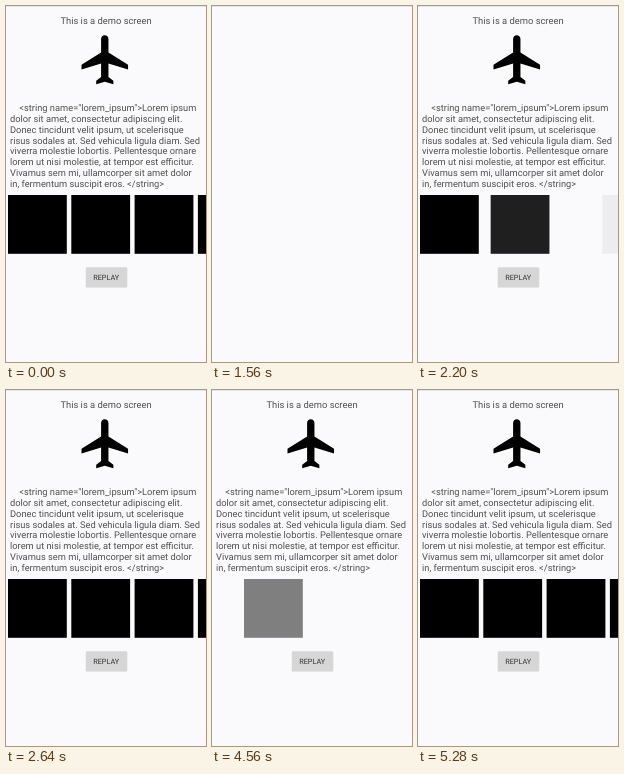
Animation of 200 by 356 pixels, one loop 5440 ms. Source, as an HTML page:

```html
<!DOCTYPE html>
<html lang="en">
<head>
<meta charset="utf-8">
<title>Demo screen</title>
<style>
  html, body { margin: 0; width: 100%; height: 100%; overflow: hidden; background: #faf9fb; }
  svg { display: block; width: 100%; height: 100%; }
  text { font-family: Roboto, "Liberation Sans", sans-serif; font-size: 9.4px; fill: #505050; white-space: pre; text-rendering: geometricPrecision; }
  #body text { font-size: 9.3px; }
  .label { font-size: 7.3px; fill: #333; }
</style>
</head>
<body>
<svg viewBox="0 0 200 356">
  <rect width="200" height="1" fill="#e4e3e5"/>
  <g id="content">
    <text x="100" y="17.6" text-anchor="middle">This is a demo screen</text>
    <path transform="translate(70.6 24.4) scale(2.45)" d="M21 16v-2l-8-5V3.5c0-.83-.67-1.5-1.5-1.5S10 2.67 10 3.5V9l-8 5v2l8-2.5V19l-2 1.5V22l3.5-1 3.5 1v-1.5L13 19v-5.5l8 2.5z"/>
    <g id="body"></g>
    <rect x="79.5" y="262" width="42" height="20" rx="1" fill="#000" opacity=".08"/>
    <rect x="80" y="261.3" width="41" height="19.7" rx="1" fill="#d6d6d7"/>
    <text class="label" x="100.2" y="273.8" text-anchor="middle">REPLAY</text>
  </g>
  <g id="tiles"></g>
</svg>
<script>
const LOOP = 5440, FADE = 290, SLIDE = 300, STAGGER = 187, SIZE = 58.8, PITCH = 63.3;
const replays = [{ at: 1560, lag: 10 }, { at: 4200, lag: 0 }];
const lines = [
  '    <string name="lorem_ipsum">Lorem ipsum',
  'dolor sit amet, consectetur adipiscing elit.',
  'Donec tincidunt velit ipsum, ut scelerisque',
  'risus sodales at. Sed vehicula ligula diam. Sed',
  'viverra molestie lobortis. Pellentesque ornare',
  'lorem ut nisi molestie, at tempor est efficitur.',
  'Vivamus sem mi, ullamcorper sit amet dolor',
  'in, fermentum suscipit eros. </string>'
];

const byId = id => document.getElementById(id);
function add(parent, tag, attrs) {
  const node = document.createElementNS('http://www.w3.org/2000/svg', tag);
  for (const key in attrs) node.setAttribute(key, attrs[key]);
  return parent.appendChild(node);
}

lines.forEach((line, i) => {
  add(byId('body'), 'text', { x: 4, y: 105.3 + i * 10.78 }).textContent = line;
});
const tiles = [0, 1, 2, 3].map(i =>
  add(byId('tiles'), 'rect', { x: 2 + i * PITCH, y: 189, width: SIZE, height: SIZE }));

const clamp = v => Math.min(1, Math.max(0, v));
const ease = v => (1 - Math.cos(Math.PI * clamp(v))) / 2;

function draw(now) {
  const time = now % LOOP;
  const run = replays.filter(r => r.at <= time).pop();
  // Before the first replay everything is already in place.
  const age = run ? time - run.at - run.lag : LOOP;
  byId('content').setAttribute('opacity', ease((age - 40) / FADE));
  tiles.forEach((tile, i) => {
    const p = ease((age - 213 - i * STAGGER) / SLIDE);
    tile.setAttribute('x', 2 + i * PITCH + SIZE * (1 - p));
    tile.setAttribute('opacity', p);
  });
}

const start = performance.now();
function tick() {
  draw(performance.now() - start);
  requestAnimationFrame(tick);
}
tick();
</script>
</body>
</html>
```
